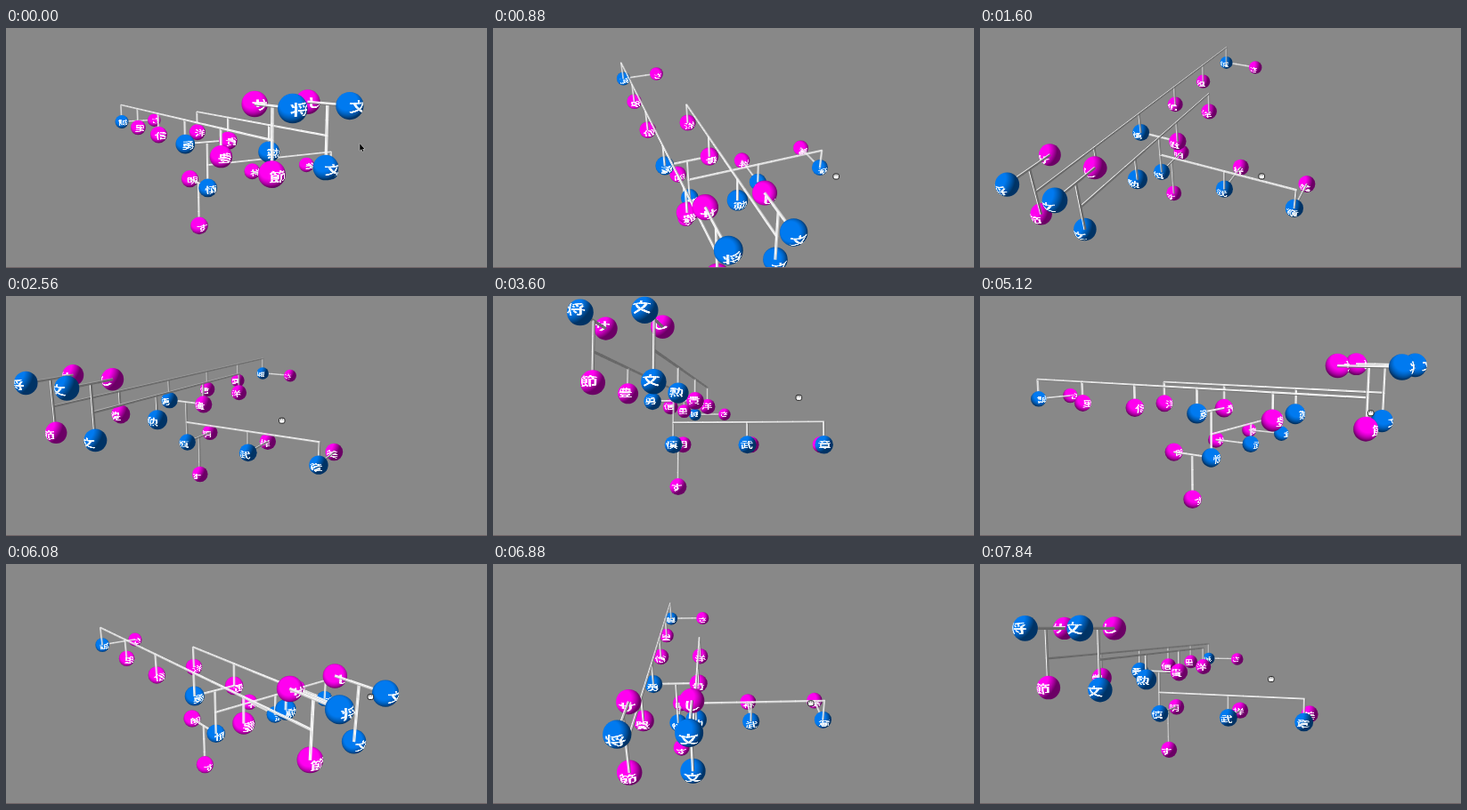
An HTML page with a canvas that plays this animation: 540 by 270 pixels, repeating every 7.92 s.

```html
<!DOCTYPE html>
<html lang="ja">
<head>
<meta charset="utf-8">
<title>Family tree</title>
<style>
html, body { margin: 0; width: 100%; height: 100%; overflow: hidden; background: #888; }
canvas { display: block; width: 540px; height: 270px; }
</style>
</head>
<body>
<canvas id="stage" width="540" height="270"></canvas>
<script>
const ctx = document.getElementById('stage').getContext('2d');
const LOOP = 7920, STEP = 80;
const FOCAL = 525, DIST = 6.7, TARGET = [0.785, 0.41, 0.37];
const R = 0.12, ROD = 0.027, GAP = 0.6, HALF = 0.3, KID = 1.015;
const LIGHT = [-0.577, 0.577, -0.577];
const BLUE = [0, 122, 240], PINK = [255, 0, 240];

// time, yaw, pitch in degrees
const path = [
  [0, -29.5, -9.3], [400, -33, -20], [800, -25.5, -30.5], [1200, 2, -34],
  [1440, 19, -34.5], [1600, 24.7, -31.6], [2000, 32, -25], [2400, 30.5, -16.5],
  [2560, 29, -13.8], [3200, 20.5, -3], [3600, 6.6, 3.4], [4000, -9, 4.5],
  [4400, -32, 3], [4800, -52, 0], [5120, -57, -8.2], [5600, -54.5, -13.5],
  [6080, -37.4, -20], [6400, -25, -24], [6800, -6, -25.5], [7200, 10, -19.5],
  [7840, 17.6, -6.7]
];

function slope(i, k) {
  const a = path[i - 1], b = path[i + 1];
  return a && b ? (b[k] - a[k]) / (b[0] - a[0]) : 0;
}

function pose(t, k) {
  let i = 0;
  while (i < path.length - 2 && t >= path[i + 1][0]) i++;
  const a = path[i], b = path[i + 1], h = b[0] - a[0];
  const u = Math.min(1, (t - a[0]) / h), u2 = u * u, u3 = u2 * u;
  return (2 * u3 - 3 * u2 + 1) * a[k] + (u3 - 2 * u2 + u) * h * slope(i, k) +
    (3 * u2 - 2 * u3) * b[k] + (u3 - u2) * h * slope(i + 1, k);
}

// ---- vectors ----
const dot = (a, b) => a[0] * b[0] + a[1] * b[1] + a[2] * b[2];
const sub = (a, b) => a.map((v, i) => v - b[i]);
const along = (a, d, k) => a.map((v, i) => v + d[i] * k);
const unit = a => a.map(v => v / Math.sqrt(dot(a, a)));
const cross = (a, b) => [
  a[1] * b[2] - a[2] * b[1], a[2] * b[0] - a[0] * b[2], a[0] * b[1] - a[1] * b[0]
];

// ---- the tree ----
const balls = [], rods = [];

function glyph(ch) {
  const c = document.createElement('canvas');
  c.width = c.height = 48;
  const g = c.getContext('2d');
  g.font = 'bold 46px "Noto Sans CJK JP", "Noto Sans CJK", sans-serif';
  g.textAlign = 'center';
  g.fillStyle = '#fff';
  g.fillText(ch, 24, 41);
  return c;
}

function ball(ch, blue, x, y, z) {
  balls.push({ p: [x, y, z], blue, face: glyph(ch) });
}

function rod(a, b) {
  const d = sub(b, a), n = Math.max(1, Math.round(Math.sqrt(dot(d, d)) / 0.2));
  for (let i = 0; i < n; i++) rods.push([along(a, d, i / n), along(a, d, (i + 1) / n)]);
}

function elders(husband, wife, x, kids, blues) {
  const y = 2 * GAP, bar = y - HALF;
  ball(husband, true, x, y, -2 - HALF);
  ball(wife, false, x, y, -2 + HALF);
  rod([x, y, -2 - HALF], [x, y, -2 + HALF]);
  rod([x, y, -2], [x, bar, -2]);
  rod([x, bar, -2], [x, bar, kids.length - 3]);
  [...kids].forEach((ch, i) => {
    ball(ch, blues.includes(ch), x, GAP, i - 2);
    rod([x, bar, i - 2], [x, GAP, i - 2]);
  });
}

elders('将', 'サ', -HALF, '節豊勇信里誠', '勇誠');
elders('文', 'し', HALF, '文勲貴洋', '文勲');
ball('さ', false, HALF, GAP, 3);
rod([-HALF, GAP, 3], [HALF, GAP, 3]);
rod([-HALF, GAP, 0], [HALF, GAP, 0]);
rod([0, GAP, 0], [0, HALF, 0]);
rod([0, HALF, 0], [2 * KID, HALF, 0]);
['慎明', '武祥', '章美'].forEach((pair, i) => {
  const x = i * KID;
  ball(pair[0], true, x, 0, 0);
  ball(pair[1], false, x, 0, GAP);
  rod([x, HALF, 0], [x, 0, 0]);
  rod([x, 0, 0], [x, 0, GAP]);
});
ball('す', false, 0, -GAP, HALF);
rod([0, 0, HALF], [0, -GAP, HALF]);

// ---- camera ----
let right, up, dir, eye;

function aim(yaw, pitch) {
  const s = Math.sin(yaw), c = Math.cos(yaw), sp = Math.sin(pitch), cp = Math.cos(pitch);
  right = [c, 0, s];
  up = [s * sp, cp, -c * sp];
  dir = [-s * cp, sp, c * cp];
  eye = along(TARGET, dir, -DIST);
}

function project(p) {
  const v = sub(p, eye), z = dot(v, dir), k = FOCAL / z;
  return { x: 270 + dot(v, right) * k, y: 135 - dot(v, up) * k, z, k };
}

// ---- drawing ----
const lit = (n, gain) => Math.min(1, 0.42 + gain * Math.max(0, dot(n, LIGHT)));

function drawRod([a, b]) {
  const axis = unit(sub(b, a)), ray = sub(eye, a);
  const front = unit(along(ray, axis, -dot(ray, axis)));
  const side = cross(axis, front);
  for (const j of [-1, 1, 0]) {
    const n = unit(along(front, side, j * 1.1));
    const p = project(along(a, side, j * ROD * 0.32)), q = project(along(b, side, j * ROD * 0.32));
    const len = Math.hypot(q.x - p.x, q.y - p.y) || 1;
    const ex = (q.x - p.x) / len * 0.4, ey = (q.y - p.y) / len * 0.4;
    const l = 245 * lit(n, 1.05);
    ctx.strokeStyle = `rgb(${l},${l},${l})`;
    ctx.lineWidth = ROD * 0.4 * (p.k + q.k) / 2;
    ctx.beginPath();
    ctx.moveTo(p.x - ex, p.y - ey);
    ctx.lineTo(q.x + ex, q.y + ey);
    ctx.stroke();
  }
}

// one lit disc per colour, shared by all balls of a frame
const SIZE = 48;
function disc(color) {
  const c = document.createElement('canvas');
  c.width = c.height = SIZE;
  return { c, g: c.getContext('2d'), img: new ImageData(SIZE, SIZE), color };
}
const blueDisc = disc(BLUE), pinkDisc = disc(PINK);

function shade({ g, img, color }) {
  const view = [dot(LIGHT, right), dot(LIGHT, up), -dot(LIGHT, dir)];
  for (let i = 0; i < SIZE * SIZE; i++) {
    let x = (i % SIZE + 0.5) / SIZE * 2 - 1, y = 1 - (Math.floor(i / SIZE) + 0.5) / SIZE * 2;
    const d = Math.max(1, Math.hypot(x, y));
    x /= d;
    y /= d;
    const z = Math.sqrt(Math.max(0, 1 - x * x - y * y));
    const l = Math.min(1, 0.42 + 0.8 * Math.max(0, dot([x, y, z], view)));
    color.forEach((v, k) => img.data[i * 4 + k] = v * l);
    img.data[i * 4 + 3] = 255;
  }
  g.putImageData(img, 0, 0);
}

const COLS = 10, ROWS = 3, LON = 0.85, LAT = 0.52;

function drawFace(b) {
  const normal = (u, v) => {
    const lon = (u * 2 - 1) * LON, lat = (1 - v * 2) * LAT;
    return [Math.sin(lon) * Math.cos(lat), Math.sin(lat), -Math.cos(lon) * Math.cos(lat)];
  };
  const spot = (u, v) => project(along(b.p, normal(u, v), R));
  const tw = 48 / COLS, th = 48 / ROWS;
  for (let i = 0; i < COLS; i++) for (let j = 0; j < ROWS; j++) {
    const u = i / COLS, v = j / ROWS;
    const n = normal(u + 0.5 / COLS, v + 0.5 / ROWS);
    if (dot(n, sub(along(b.p, n, R), eye)) >= 0) continue;
    const o = spot(u, v), a = spot(u + 1 / COLS, v), d = spot(u, v + 1 / ROWS);
    ctx.save();
    ctx.transform((a.x - o.x) / tw, (a.y - o.y) / tw, (d.x - o.x) / th, (d.y - o.y) / th, o.x, o.y);
    ctx.drawImage(b.face, i * tw, j * th, tw, th, 0, 0, tw + 0.4, th + 0.4);
    ctx.restore();
  }
}

function drawBall(b) {
  const c = project(b.p), r = R * c.k;
  ctx.save();
  ctx.beginPath();
  ctx.arc(c.x, c.y, r, 0, Math.PI * 2);
  ctx.clip();
  ctx.drawImage((b.blue ? blueDisc : pinkDisc).c, c.x - r - 0.5, c.y - r - 0.5, 2 * r + 1, 2 * r + 1);
  drawFace(b);
  ctx.restore();
}

function drawCursor(x, y, held) {
  ctx.save();
  ctx.translate(x, y);
  ctx.lineWidth = 1;
  ctx.lineJoin = 'round';
  ctx.beginPath();
  if (held) {
    ctx.roundRect(-3, -2.5, 6.5, 6, 2);
    ctx.fillStyle = '#fff';
    ctx.strokeStyle = '#222';
    ctx.fill();
    ctx.stroke();
    ctx.beginPath();
    ctx.moveTo(-1, -2);
    ctx.lineTo(-1, 0);
    ctx.moveTo(1.2, -2);
    ctx.lineTo(1.2, 0);
    ctx.lineWidth = 0.6;
    ctx.stroke();
  } else {
    const tip = new Path2D('M0-3V5L1.8 3.4 3 6 4.2 5.4 3 3H5.2Z');
    ctx.strokeStyle = '#ddd';
    ctx.stroke(tip);
    ctx.fillStyle = '#000';
    ctx.fill(tip);
  }
  ctx.restore();
}

function draw(t) {
  const yaw = pose(t, 1), pitch = pose(t, 2);
  aim(yaw * Math.PI / 180, pitch * Math.PI / 180);
  shade(blueDisc);
  shade(pinkDisc);
  ctx.fillStyle = '#888';
  ctx.fillRect(0, 0, 540, 270);

  const items = rods.map(r => ({
    z: (project(r[0]).z + project(r[1]).z) / 2, paint: () => drawRod(r)
  }));
  for (const b of balls) items.push({ z: project(b.p).z - 0.05, paint: () => drawBall(b) });
  items.sort((a, b) => b.z - a.z).forEach(i => i.paint());

  ctx.fillStyle = '#706467';
  ctx.fillRect(0, 269, 540, 1);
  drawCursor(353 - yaw * 1.5, 119 - pitch * 1.5, t > 0);
}

const start = performance.now();
let shown = -1;
function tick(now) {
  const t = Math.floor(Math.max(0, now - start) % LOOP / STEP) * STEP;
  if (t !== shown) draw(shown = t);
  requestAnimationFrame(tick);
}
draw(shown = 0);
requestAnimationFrame(tick);
</script>
</body>
</html>
```
